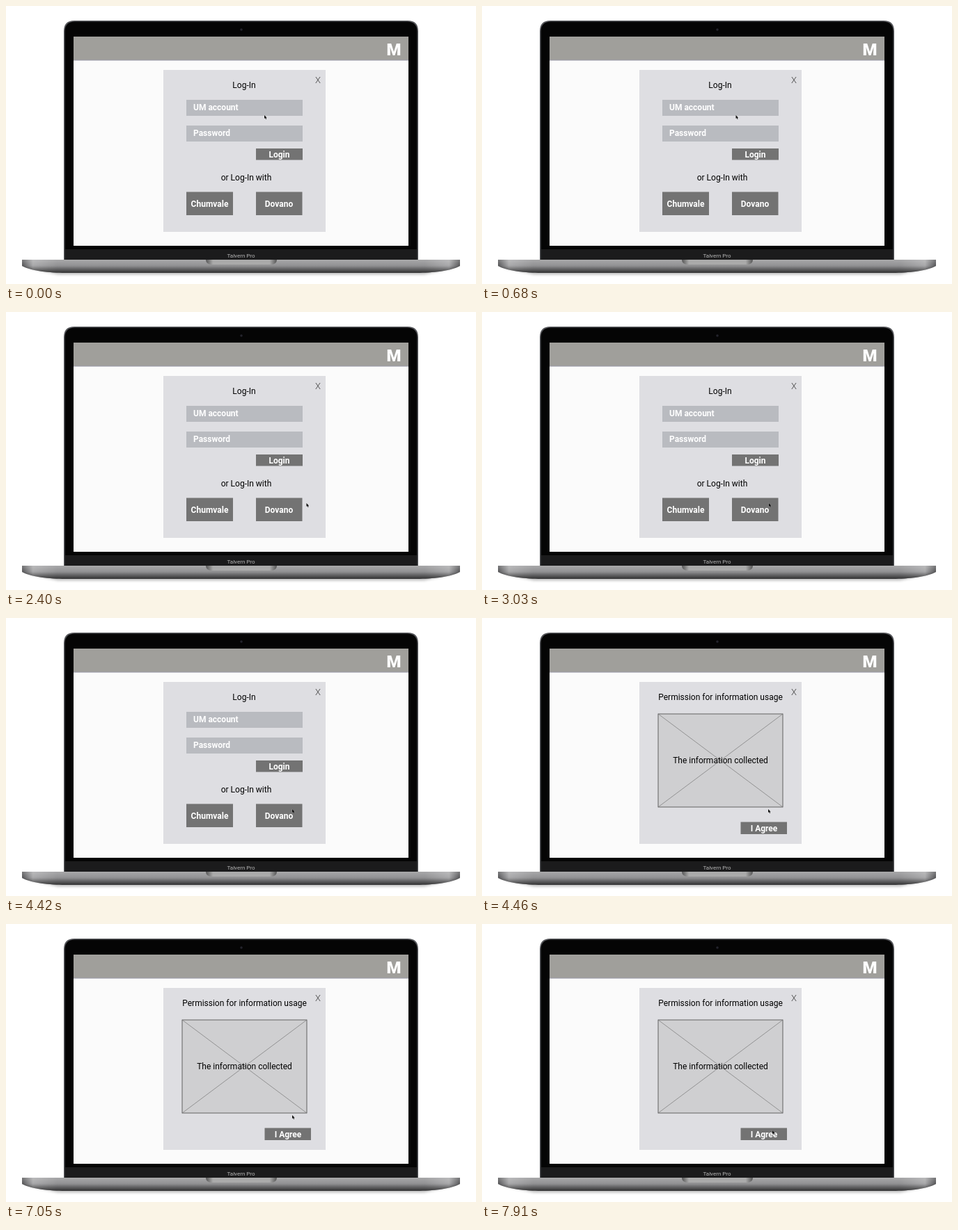
Recreate the animation shown at these times as an HTML page. Size 675 by 400 pixels, loop 8000 ms.

```html
<!DOCTYPE html>
<html lang="en">
<head>
<meta charset="utf-8">
<title>Log-in prototype</title>
<style>
  html, body { margin: 0; width: 100%; height: 100%; overflow: hidden; background: #fff; }
  svg { display: block; width: 675px; height: 400px; }
  text { font: 12px Roboto, sans-serif; text-anchor: middle; }
  .label { font-weight: 600; fill: #fff; }
  .left { text-anchor: start; }
  .field { fill: #b9bbc0; }
  .button { fill: #737373; }
</style>
</head>
<body>
<svg viewBox="0 0 675 400">
  <defs>
    <linearGradient id="metal">
      <stop offset="0" stop-color="#4a4a4c"/>
      <stop offset=".025" stop-color="#a4a4a6"/>
      <stop offset=".08" stop-color="#8b8b8d"/>
      <stop offset=".92" stop-color="#8b8b8d"/>
      <stop offset=".975" stop-color="#a4a4a6"/>
      <stop offset="1" stop-color="#4a4a4c"/>
    </linearGradient>
    <linearGradient id="shade" x2="0" y2="1">
      <stop offset="0" stop-color="#fff" stop-opacity=".25"/>
      <stop offset=".4" stop-color="#fff" stop-opacity=".08"/>
      <stop offset=".6" stop-color="#000" stop-opacity=".15"/>
      <stop offset="1" stop-color="#000" stop-opacity=".65"/>
    </linearGradient>
    <linearGradient id="notch">
      <stop offset="0" stop-color="#555"/>
      <stop offset=".1" stop-color="#aaa"/>
      <stop offset=".9" stop-color="#aaa"/>
      <stop offset="1" stop-color="#555"/>
    </linearGradient>
    <filter id="soft" x="-10%" y="-100%" width="120%" height="300%"><feGaussianBlur stdDeviation="2"/></filter>
    <path id="base" d="M23 365H652V374C640 381 612 384 590 384H85C63 384 35 381 23 374Z"/>
  </defs>

  <path d="M30 376H645L600 386H75Z" fill="#000" opacity=".3" filter="url(#soft)"/>
  <path d="M83 365V36Q83 21 98 21H577Q592 21 592 36V365Z" fill="#55565a"/>
  <path d="M84.5 365V37Q84.5 22.5 99 22.5H576Q590.5 22.5 590.5 37V365Z" fill="#050505"/>
  <rect x="85" y="350" width="505" height="15" fill="#1b1b1c"/>
  <circle cx="338" cy="34" r="1.8" fill="#24242c"/>
  <text x="337.5" y="362" style="font-size:8px" fill="#b5b5b5">Talvern Pro</text>
  <use href="#base" fill="url(#metal)"/>
  <use href="#base" fill="url(#shade)"/>
  <path d="M287 365H389Q389 372 380 372H296Q287 372 287 365Z" fill="url(#notch)"/>

  <rect x="97" y="44" width="481" height="301" fill="#fbfbfb"/>
  <rect x="97" y="44" width="481" height="34" fill="#a09f9b"/>
  <path d="M97 78H578" stroke="#9a9aa8"/>
  <text x="557" y="71" style="font-size:24px;font-weight:900" fill="#fff">M</text>
  <rect x="226" y="92" width="233" height="233" fill="#dedee2"/>
  <text x="448" y="110.5" style="font-size:13px;font-weight:300" fill="#444">X</text>

  <g id="login">
    <text x="342" y="117.5">Log-In</text>
    <rect class="field" x="259" y="135" width="167" height="23"/>
    <text class="label left" x="269" y="150">UM account</text>
    <rect class="field" x="259" y="172" width="167" height="23"/>
    <text class="label left" x="269" y="187">Password</text>
    <rect class="button" x="359" y="205" width="67" height="16.5"/>
    <text class="label" x="392.5" y="217.5">Login</text>
    <text x="345" y="251">or Log-In with</text>
    <rect class="button" x="259" y="267.5" width="67" height="33.5"/>
    <text class="label" x="292.5" y="288.5">Chumvale</text>
    <rect class="button" x="359" y="267.5" width="66.5" height="33.5"/>
    <text class="label" x="392" y="288.5">Dovano</text>
  </g>

  <g id="permission">
    <text x="342.5" y="117.5">Permission for information usage</text>
    <rect x="253" y="138" width="179" height="134" fill="#cfcfd1" stroke="#444" stroke-width=".8"/>
    <path d="M253 138L432 272M432 138L253 272" stroke="#777" stroke-width=".7"/>
    <text x="342.5" y="209">The information collected</text>
    <rect class="button" x="371.5" y="293.5" width="66.5" height="17.5"/>
    <text class="label" x="405" y="306.5">I Agree</text>
  </g>

  <path id="cursor" d="M0 0V5L1.2 4L2.1 6L3.1 5.6L2.3 3.7H3.7Z" fill="#111" stroke="#fff" stroke-opacity=".6" stroke-width=".5" paint-order="stroke"/>
</svg>
<script>
  const LOOP = 8000, AGREE_AT = 4460;
  // start, end, target x, target y
  const moves = [
    [20, 140, 365, 157],
    [630, 680, 364.5, 157],
    [1160, 1950, 433, 275.5],
    [2050, 2090, 431.5, 275],
    [2400, 3190, 411, 275],
    [7050, 7770, 416, 295],
    [7870, 7910, 417, 297]
  ];
  const byId = id => document.getElementById(id);
  const ease = u => { const v = u ** 0.6; return v * v * (3 - 2 * v); };

  function cursorAt(t) {
    let x = 371, y = 157;
    for (const [start, end, toX, toY] of moves) {
      if (t < start) break;
      const k = ease(Math.min(1, (t - start) / (end - start)));
      x += (toX - x) * k;
      y += (toY - y) * k;
    }
    return [x, y];
  }

  function draw() {
    const t = performance.now() % LOOP;
    const agreed = t >= AGREE_AT;
    byId('login').style.display = agreed ? 'none' : '';
    byId('permission').style.display = agreed ? '' : 'none';
    byId('cursor').setAttribute('transform', `translate(${cursorAt(t)})`);
    requestAnimationFrame(draw);
  }
  draw();
</script>
</body>
</html>
```
